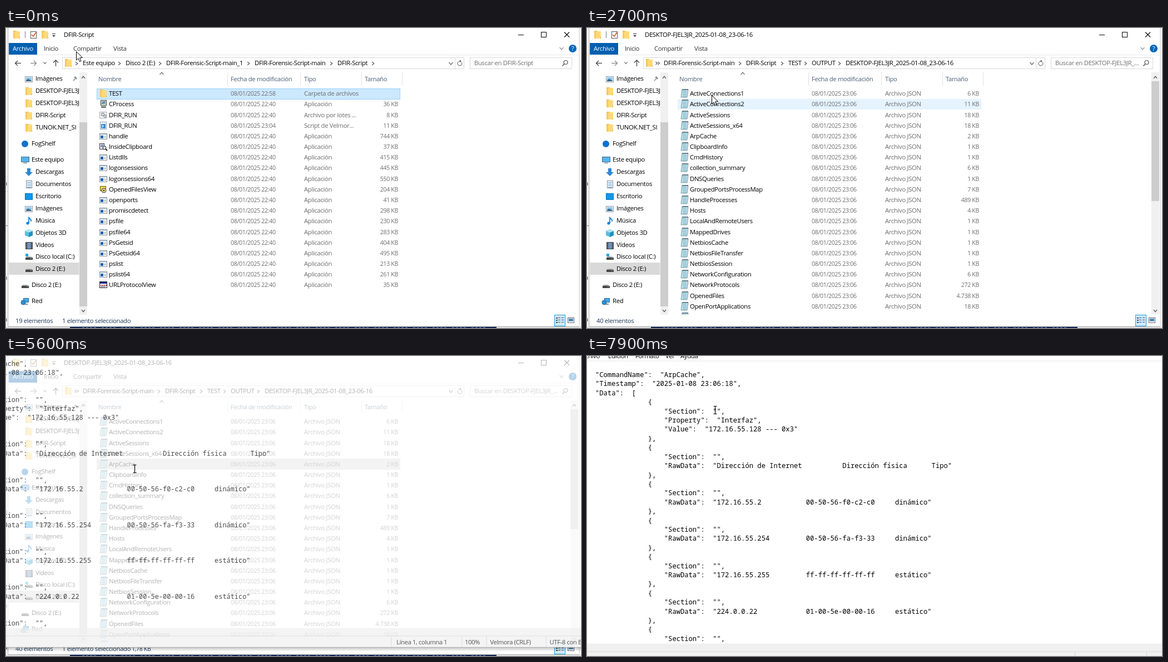
These frames come from a looping animation (1034x541 px, 8 s). An HTML page with a canvas:

```html
<!DOCTYPE html>
<html lang="es">
<head>
<meta charset="utf-8">
<title>Explorador y bloc de notas</title>
<style>
html, body { margin: 0; width: 100%; height: 100%; overflow: hidden; background: #fff; }
canvas { display: block; }
</style>
</head>
<body>
<canvas id="stage" width="1034" height="541"></canvas>
<script>
const ctx = document.getElementById('stage').getContext('2d');
const LOOP = 8000, STEP = 100;
const ROW0 = 108.6, ROW_H = 19.18;
const UI = '"Open Sans", "Noto Sans", sans-serif';
const MONO = '"Noto Sans Mono", "DejaVu Sans Mono", monospace';
const HOST = 'DESKTOP-FJEL3JR';
const REPORT = HOST + '_2025-01-08_23-06-16';
const GREY = '#6d6d6d';

// ---------- helpers ----------
function rect(x, y, w, h, fill, line) {
  if (fill) { ctx.fillStyle = fill; ctx.fillRect(x, y, w, h); }
  if (line) { ctx.strokeStyle = line; ctx.lineWidth = 1; ctx.strokeRect(x + .5, y + .5, w - 1, h - 1); }
}
function path(points, line, width = 1, fill) {
  ctx.beginPath();
  for (let i = 0; i < points.length; i += 2) ctx.lineTo(points[i], points[i + 1]);
  if (fill) { ctx.closePath(); ctx.fillStyle = fill; ctx.fill(); }
  if (line) { ctx.strokeStyle = line; ctx.lineWidth = width; ctx.stroke(); }
}
function disc(x, y, r, fill, line, width = 1) {
  ctx.beginPath();
  ctx.arc(x, y, r, 0, 7);
  if (fill) { ctx.fillStyle = fill; ctx.fill(); }
  if (line) { ctx.strokeStyle = line; ctx.lineWidth = width; ctx.stroke(); }
}
function text(s, x, midY, color = '#000', size = 11.3, align = 'left') {
  ctx.font = size + 'px ' + UI;
  ctx.letterSpacing = '-0.33px';
  ctx.textAlign = align;
  ctx.fillStyle = color;
  ctx.fillText(s, x, midY + 4);
}
function chevron(x, y, dir, color = '#555', r = 3) {
  const h = r * .6;
  const p = { right: [-h, -r, h, 0, -h, r], down: [-r, -h, 0, h, r, -h], up: [-r, h, 0, -h, r, h] }[dir];
  path(p.map((v, i) => v + (i % 2 ? y : x)), color, 1.2);
}
function clipped(x, y, w, h, draw) {
  ctx.save();
  ctx.beginPath();
  ctx.rect(x, y, w, h);
  ctx.clip();
  draw();
  ctx.restore();
}
// Linear interpolation over [time, ...values] keys.
function track(keys, t) {
  let i = keys.findIndex(k => k[0] > t);
  if (i < 0) return keys[keys.length - 1].slice(1);
  if (i === 0) return keys[0].slice(1);
  const a = keys[i - 1], b = keys[i], u = (t - a[0]) / (b[0] - a[0]);
  return a.slice(1).map((v, j) => v + (b[j + 1] - v) * u);
}

// ---------- icons, drawn around their centre ----------
const icons = {
  folder() {
    rect(-6, -7, 6, 3, '#e8b94a');
    rect(-6, -6, 12, 13, '#ffd978');
    rect(-6, -6, 3, 13, '#f7c95c');
    rect(5, 4, 1, 3, '#e0b050');
  },
  app() {
    rect(-7, -5, 14, 11, '#fff', '#8a8f96');
    rect(-6, -4, 12, 2, '#c4d3e2');
    rect(-5, -1, 5, 5, '#1c62b9');
    rect(1, 0, 4, 1, '#9aa');
    rect(1, 2, 4, 1, '#9aa');
  },
  json() {
    path([-4, -7, 7, -7, 5, 7, -6, 7], '#7d98a3', 1, '#bfe3ee');
    for (let y = -4; y < 6; y += 3) path([-3, y, 4, y], '#6fa6bb');
    path([-4, -7, 7, -7], '#4d6a74', 1.5);
  },
  batch() {
    rect(-7, -6, 13, 12, '#f4f6f8', '#a4abb2');
    disc(-1, -1, 2.5, null, '#8b969f', 1.5);
    disc(3, 2, 2, null, '#8b969f', 1.3);
  },
  script() {
    rect(-6, -7, 12, 14, '#eef5fb', '#8fa5b8');
    rect(-4, -3, 8, 8, '#3b8cc9');
    path([-2, -1, 0, 1, -2, 3], '#fff', 1.2);
  },
  cproc() {
    rect(-5, -7, 11, 10, '#d9e8d4', '#33423a');
    path([-3, -4, 4, -4, -3, -1, 4, -1], '#234c86');
    rect(-4, 4, 9, 3, '#777');
  },
  clip() {
    rect(-7, -6, 9, 11, '#f3f3f3', '#333');
    path([-5, -3, 0, -3, -5, 0, 0, 0], '#234c9c');
    disc(2, 2, 3, '#d8e8ff', '#222');
    path([4, 4, 7, 7], '#222', 2);
  },
  opened() {
    rect(-6, -6, 11, 9, '#f0d25a', '#665512');
    disc(1, 2, 4, '#f8e89a', '#333');
    disc(1, 2, 1.5, '#333');
  },
  url() {
    rect(-7, -6, 14, 12, '#fff', '#223');
    rect(-6, -5, 12, 3, '#17268c');
    for (let x = -5; x < 5; x += 3) rect(x, 0, 2, 2, '#b22a3a');
    rect(-5, 3, 9, 1, '#333');
  },
  picture() {
    rect(-7, -5, 14, 11, '#fff', '#8497a5');
    rect(-5, -3, 10, 7, '#8cc5ed');
    path([-5, 4, -5, 2, -1, 0, 5, 3, 5, 4], null, 1, '#355f7d');
  },
  cloud() { disc(0, 0, 6, '#0f72cf'); },
  pc() {
    rect(-7, -6, 15, 10, '#55b4ee', '#3b6f94');
    rect(-3, 5, 7, 1, '#4b6373');
  },
  down() { path([-3, -7, 3, -7, 3, 0, 7, 0, 0, 7, -7, 0, -3, 0], null, 1, '#2f86d1'); },
  doc() {
    rect(-5, -7, 11, 14, '#fff', '#7d8d99');
    for (let y = -4; y < 6; y += 3) path([-3, y + .5, 4, y + .5], '#4a8fc4');
  },
  desk() { rect(-7, -6, 14, 12, '#0f97ea', '#0870b8'); },
  music() {
    disc(-2, 4, 2.6, '#1780d4');
    path([0, 4, 0, -6, 4, -2, 4, 1], '#1780d4', 1.8);
  },
  cube() {
    path([0, -7, 7, -4, 7, 4, 0, 7, -7, 4, -7, -4], null, 1, '#58bfe2');
    path([0, -1, 7, -4, 7, 4, 0, 7], null, 1, '#2590bd');
    path([0, -7, 7, -4, 0, -1, -7, -4], null, 1, '#a7e4f4');
  },
  video() {
    rect(-6, -6, 13, 13, '#3a3a3a');
    rect(-3, -5, 7, 11, '#6f92b8');
    for (let y = -5; y < 6; y += 3) { rect(-5, y, 1, 1, '#fff'); rect(5, y, 1, 1, '#fff'); }
  },
  drive() {
    path([-4, -1, 4, -1, 7, 2, -6, 2], null, 1, '#aaa');
    rect(-6, 1, 13, 4, '#444');
    rect(3, 2, 2, 1, '#6fe08c');
  },
  system() {
    rect(-6, -6, 5, 5, '#27a3e8');
    icons.drive();
  },
  net() {
    rect(-3, -6, 10, 8, '#4aa7e2', '#2c6d9c');
    disc(-3, 2, 4, '#2f8fce', '#1f6a9c');
    path([-1, 5, 5, 5], '#567', 1.5);
  }
};
function icon(kind, x, y) {
  ctx.save();
  ctx.translate(Math.round(x), Math.round(y));
  icons[kind]();
  ctx.restore();
}

// ---------- folder contents ----------
const kinds = { folder: 'Carpeta de archivos', app: 'Aplicación', json: 'Archivo JSON',
  batch: 'Archivo por lotes ...', script: 'Script de Velmor...' };
// name,size,kind,time
function files(list, kind, time) {
  return list.split(' ').map(s => {
    const [name, size, k = kind, at = time] = s.split(',');
    return { name, size, kind: k, date: '08/01/2025 ' + at };
  });
}
const disk = [[138, 'Este equipo'], [215, 'Disco 2 (E:)'], [288, 'DFIR-Forensic-Script-main_1'],
  [447, 'DFIR-Forensic-Script-main'], [596, 'DFIR-Script']];
const test = [671, 'TEST'];
const folders = {
  script: {
    title: 'DFIR-Script', crumbs: disk, tail: 660, count: '19 elementos',
    rows: files('TEST,,folder,22:58 CProcess,36,cproc DFIR_RUN,8,batch DFIR_RUN,11,script,23:04 handle,744 ' +
      'InsideClipboard,37,clip Listdlls,415 logonsessions,445 logonsessions64,550 OpenedFilesView,204,opened ' +
      'openports,41 promiscdetect,298 psfile,230 psfile64,283 PsGetsid,404 PsGetsid64,495 pslist,213 ' +
      'pslist64,261 URLProtocolView,35,url', 'app', '22:40')
  },
  test: {
    title: 'TEST', crumbs: [...disk, test], tail: 703, count: '1 elemento',
    rows: files('OUTPUT,', 'folder', '23:06')
  },
  output: {
    title: 'OUTPUT', crumbs: [...disk, test, [714, 'OUTPUT']], count: '2 elementos',
    rows: files(`${HOST}_2025-01-08_23-04-53,,folder,23:13 ${REPORT},`, 'folder', '23:06')
  },
  report: {
    title: REPORT, search: HOST + '_...', count: '40 elementos', scroll: true,
    crumbs: [[138, 'DFIR-Forensic-Script-main'], [286, 'DFIR-Script'], [362, 'TEST'], [404, 'OUTPUT'], [465, REPORT]],
    rows: files('ActiveConnections1,6 ActiveConnections2,11 ActiveSessions,18 ActiveSessions_x64,18 ArpCache,2 ' +
      'ClipboardInfo,1 CmdHistory,1 collection_summary,6 DNSQueries,1 GroupedPortsProcessMap,7 ' +
      'HandleProcesses,489 Hosts,4 LocalAndRemoteUsers,1 MappedDrives,1 NetbiosCache,1 NetbiosFileTransfer,1 ' +
      'NetbiosSession,1 NetworkConfiguration,6 NetworkProtocols,272 OpenedFiles,4.738 ' +
      'OpenPortApplications,18 PowerShellHistory,13', 'json', '23:06')
  }
};
const places = [
  [91, 'picture', 'Imágenes'], [113, 'folder', HOST], [135, 'folder', HOST], [157, 'folder', 'DFIR-Script'],
  [179, 'folder', 'TUNOK.NET_SI'], [208, 'cloud', 'FogShelf', 1], [237, 'pc', 'Este equipo', 1],
  [259, 'down', 'Descargas'], [281, 'doc', 'Documentos'], [303, 'desk', 'Escritorio'],
  [325, 'picture', 'Imágenes'], [347, 'music', 'Música'], [369, 'cube', 'Objetos 3D'],
  [391, 'video', 'Vídeos'], [412, 'system', 'Disco local (C:)'], [434, 'drive', 'Disco 2 (E:)'],
  [463, 'drive', 'Disco 2 (E:)', 1], [492, 'net', 'Red', 1]
];

// ---------- motion ----------
const pointer = [
  [0, 126, 42], [100, 135, 60], [200, 163, 108], [300, 190, 148], [400, 200, 157], [500, 203, 140],
  [600, 205, 122], [1400, 205, 122], [1600, 217, 122], [1700, 221, 122], [1900, 224, 138], [2500, 224, 138],
  [2600, 224, 130], [2700, 224, 121], [2800, 228, 170], [3000, 262, 380], [3100, 280, 470],
  [3300, 308, 330], [3400, 313, 306], [3500, 300, 314], [3600, 280, 322], [3700, 262, 321],
  [4300, 238, 238], [4600, 230, 201], [4700, 230, 201], [4800, 231, 202], [5600, 231, 203],
  [5800, 222, 120], [6000, 210, 20], [6100, 205, -35], [7800, 215, -35], [7900, 230, 97]
];
const drag = [
  [7100, -22, -9], [7200, 0, 0], [7300, 38, 4], [7400, 72, 8], [7500, 95, 11], [7600, 95, 11],
  [7700, 118, 12], [7800, 142, 14], [7900, 158, 14.5]
];
const opening = [[5500, .95, .3], [5600, .983, .7], [5700, .997, .95], [5800, 1, 1]];
const tipFade = [[3400, 0], [3500, 1], [3600, 1], [3700, .9], [3800, .4], [3900, 0]];

// ---------- explorer ----------
function scrollbar(x, top, bottom) {
  rect(x, 80, 14, 437, '#f0f0f0');
  rect(x, top, 14, bottom - top, '#cdcdcd');
  chevron(x + 7, 89, 'up', '#444');
  chevron(x + 7, 510, 'down', '#444');
}
function backdrop() {
  rect(0, 0, 1034, 541, '#fff');
  [280, 450, 525].forEach(y => text('a', -4, y, '#333'));
  path([0, 356.5, 3, 356.5], '#777');
  path([3.5, 0, 3.5, 538], '#a6a6a6');
  path([1031, 0, 1031, 538], '#c4c4c4');
  path([3, 538.5, 1031, 538.5], '#a6a6a6');
  rect(0, 539, 1034, 2, '#e4e4e4');
  rect(115, 539, 767, 2, '#0b2452');
  for (let x = 130; x < 872; x += 7) if (x * 13 % 5) rect(x, 540, 4, 1, '#7e93b4');
}
function titleBar(title) {
  icon('folder', 19, 12);
  path([34.5, 6, 34.5, 18], '#777');
  rect(44, 6, 11, 13, '#fff', '#555');
  path([46, 12, 49, 15, 54, 8], '#d0562c', 1.6);
  icon('folder', 70, 12);
  path([83, 10.5, 89, 10.5], '#333');
  path([83, 13, 89, 13, 86, 16], null, 1, '#333');
  text(title, 104, 12);
  path([921, 12.5, 931, 12.5], '#000');
  rect(962, 7, 10, 10, null, '#000');
  path([1004, 7.5, 1013, 16.5], '#000', 1.1);
  path([1013, 7.5, 1004, 16.5], '#000', 1.1);
}
function ribbon() {
  rect(5, 27, 51, 21, '#005fb0');
  text('Archivo', 12, 37, '#fff');
  text('Inicio', 68, 37, '#333');
  text('Compartir', 121, 37, '#333');
  text('Vista', 193, 37, '#333');
  path([56, 48.5, 1031, 48.5], '#e8e8e8');
  chevron(999, 37, 'down', '#8a8a8a', 3.5);
  disc(1019, 37, 7, '#0067b8');
  text('?', 1019, 37, '#fff', 11, 'center');
}
function addressBar(f, t) {
  path([27, 63.5, 17, 63.5], '#444', 1.3);
  path([21, 59, 16.5, 63.5, 21, 68], '#444', 1.3);
  path([44, 63.5, 54, 63.5], '#888', 1.3);
  path([50, 59, 54.5, 63.5, 50, 68], '#888', 1.3);
  chevron(70, 63, 'down', '#777', 2.5);
  path([89.5, 69, 89.5, 58], '#444', 1.3);
  path([85, 62.5, 89.5, 58, 94, 62.5], '#444', 1.3);
  rect(101, 53, 723, 21, '#fff', '#d9d9d9');
  icon('folder', 112, 63);
  f.crumbs.forEach(([x, label], i) => {
    if (f.scroll && !i) { chevron(125, 63.5, 'right', '#555', 2.5); chevron(129, 63.5, 'right', '#555', 2.5); }
    else chevron(x - 11, 64, 'right');
    text(label, x, 63);
  });
  if (f.tail && !(f === folders.test && t < 1200)) chevron(f.tail, 64, 'right');
  chevron(800, 64, 'down', '#555', 3.5);
  path([807.5, 54, 807.5, 73], '#d9d9d9');
  ctx.beginPath();
  ctx.arc(816, 64, 4, -.6, 4.7);
  ctx.strokeStyle = '#555';
  ctx.stroke();
  path([816, 57.5, 819, 60, 816, 62], null, 1, '#555');
  rect(834, 53, 184, 21, '#fff', '#d9d9d9');
  text('Buscar en ' + (f.search || f.title), 842, 63, GREY);
  disc(1006.5, 62, 3.5, null, '#555', 1.2);
  path([1004, 64.5, 1000.5, 68.5], '#555', 1.5);
}
function sidebar() {
  clipped(4, 80, 127.5, 437, () => {
    rect(5, 423, 127, 22, '#d9d9d9');
    for (const [y, kind, label, top] of places) {
      icon(kind, top ? 34 : 41, y + 1);
      text(label, top ? 46 : 53, y);
    }
  });
  path([121, 95, 124, 92], '#777', 1.2);
  path([122, 89, 126, 93, 128, 91, 125, 87], null, 1, '#8a9299');
  scrollbar(132, 170, 502);
}
function list(f, selected, hover, focused) {
  const heads = { 166: 'Nombre', 404: 'Fecha de modificación', 536: 'Tipo', 645: 'Tamaño' };
  for (const x in heads) text(heads[x], +x, 92, '#4c607a');
  [398, 529, 639, 712].forEach(x => path([x + .5, 80, x + .5, 104], '#e2e2e2'));
  chevron(280, 82, 'up', '#666', 3.5);
  clipped(150, 105, 865, 412, () => f.rows.forEach((r, i) => {
    const top = ROW0 + i * ROW_H, y = Math.round(top + ROW_H / 2);
    if (i === selected) rect(163, Math.round(top), 546, 20, focused ? '#cce8ff' : '#d9d9d9', focused && '#99d1ff');
    else if (i === hover) rect(163, Math.round(top), 546, 19, '#e5f3ff');
    icon(r.kind, 174.5, y);
    text(r.name, 185, y);
    text(r.date, 404, y, GREY, 10.6);
    text(kinds[r.kind] || kinds.app, 536, y, GREY);
    if (r.size) text(r.size + ' KB', 705, y, GREY, 10.6, 'right');
  }));
  if (f.scroll) scrollbar(1015, 96, 312);
}
function statusBar(f, selected) {
  const navy = '#1e395b';
  text(f.count, 17, 528, navy);
  if (selected >= 0) text('1 elemento seleccionado', 101, 528, navy);
  if (selected >= 0 && f.scroll) text('1,78 KB', 226, 528, navy, 10.6);
  rect(986, 517, 20, 21, '#cce8ff', '#26a0da');
  for (let y = 522; y < 534; y += 4) {
    rect(989, y, 3, 2, '#456');
    rect(993, y, 4, 1, '#456');
    rect(999, y, 4, 1, '#456');
  }
  rect(1010, 522, 12, 10, '#fff', '#667');
  rect(1012, 524, 8, 5, '#4b8ab8');
}
function tooltip(alpha) {
  if (alpha <= 0) return;
  ctx.save();
  ctx.globalAlpha = alpha;
  rect(520, 329, 3, 45, 'rgba(0,0,0,.3)');
  rect(316, 371, 204, 3, 'rgba(0,0,0,.3)');
  rect(313, 326, 207, 45, '#fff', '#767676');
  ['Tipo: Archivo JSON', 'Tamaño: 488 KB', 'Fecha de modificación: 08/01/2025 23:06']
    .forEach((s, i) => text(s, 319, 335 + i * 13.7, '#6a6a6a', 11));
  ctx.restore();
}
function explorer(t) {
  const name = t < 1000 ? 'script' : t < 1500 ? 'test' : t < 2300 ? 'output' : 'report';
  const f = folders[name];
  const selected = name === 'script' ? 0 : name === 'output' && t >= 2100 ? 1 : t >= 5300 ? 4 : -1;
  // Row highlight trails the pointer by one step.
  const [px, py] = track(pointer, Math.max(0, t - STEP));
  const hover = px >= 163 && t < 5500 ? Math.floor((py - ROW0) / ROW_H) : -1;
  backdrop();
  titleBar(f.title);
  ribbon();
  addressBar(f, t);
  sidebar();
  list(f, selected, hover, t < 5500);
  statusBar(f, selected);
  tooltip(track(tipFade, t)[0]);
}

// ---------- notepad ----------
const arp = [['172.16.55.2', '00-50-56-f0-c2-c0', 'dinámico'], ['172.16.55.254', '00-50-56-fa-f3-33', 'dinámico'],
  ['172.16.55.255', 'ff-ff-ff-ff-ff-ff', 'estático'], ['224.0.0.22', '01-00-5e-00-00-16', 'estático']];
const pad = ' '.repeat(17), brace = ' '.repeat(13);
const section = pad + '"Section":  "",';
const raw = s => [brace + '{', section, pad + '"RawData":  "' + s + '"', brace + '},'];
const lines = [
  '"CommandName":  "ArpCache",', '"Timestamp":  "2025-01-08 23:06:18",', '"Data":  [',
  brace + '{', section, pad + '"Property":  "Interfaz",', pad + '"Value":  "172.16.55.128 --- 0x3"', brace + '},',
  ...raw('Dirección de Internet' + ' '.repeat(10) + 'Dirección física' + ' '.repeat(6) + 'Tipo'),
  ...arp.flatMap(([ip, mac, type]) => raw(ip.padEnd(22) + mac + '     ' + type)),
  brace + '{', section
];
const win = { left: -178, top: -58, right: 1090, bottom: 540 };

function notepad(t) {
  if (t < 5500) return;
  const [scale, alpha] = track(opening, t), [dx, dy] = track(drag, t);
  const cx = (win.left + win.right) / 2, cy = (win.top + win.bottom) / 2;
  const w = win.right - win.left;
  ctx.save();
  ctx.globalAlpha = alpha;
  ctx.translate(cx + dx, cy + dy);
  ctx.scale(scale, scale);
  ctx.translate(-cx, -cy);
  // The shadow stays outside, so the fading sheet remains white.
  const shade = ctx.createLinearGradient(0, win.bottom, 0, win.bottom + 7);
  shade.addColorStop(0, 'rgba(0,0,0,.3)');
  shade.addColorStop(1, 'rgba(0,0,0,0)');
  rect(win.left, win.bottom, w, 7, shade);
  rect(win.left, win.top, w, win.bottom - win.top, '#fff');

  const menu = { '-172': 'Archivo', '-120': 'Edición', '-71': 'Formato', '-17': 'Ver', 10: 'Ayuda' };
  for (const x in menu) text(menu[x], +x, -15);
  path([win.left, -5.5, win.right, -5.5], '#e6e6e6');

  ctx.font = '12.15px ' + MONO;
  ctx.letterSpacing = '0px';
  ctx.textAlign = 'left';
  ctx.fillStyle = '#000';
  lines.forEach((s, i) => ctx.fillText(s, -143, 23.5 + i * 16.41));

  rect(win.left, 504, w, 36, '#f0f0f0');
  path([win.left, 518.5, win.right, 518.5], '#d7d7d7');
  [719, 848, 893, 1002].forEach(x => path([x + .5, 519, x + .5, 539], '#d2d2d2'));
  const info = { 729: 'Línea 1, columna 1', 854: '100%', 900: 'Velmora (CRLF)', 1009: 'UTF-8 con BOM' };
  for (const x in info) text(info[x], +x, 530, '#111');
  path([win.left, 539.5, win.right, 539.5], '#8a8a8a');
  ctx.restore();
}

// ---------- pointer ----------
function cursor(t) {
  const [x, y] = track(pointer, t);
  ctx.save();
  ctx.translate(Math.round(x), Math.round(y));
  if (t < 5500) {
    path([.5, .5, .5, 16, 4, 12.8, 6.4, 18.5, 9, 17.4, 6.6, 11.8, 11.5, 11.5, .5, .5], '#000', 1, '#fff');
  } else {
    path([.5, -6, .5, 7], '#000', 1.2);
    path([-2.5, -6.5, 3.5, -6.5], '#000');
    path([-2.5, 7.5, 3.5, 7.5], '#000');
  }
  ctx.restore();
}

const start = performance.now();
function frame() {
  const ms = (performance.now() - start) % LOOP;
  const t = Math.floor(ms / STEP) * STEP;
  explorer(t);
  notepad(t);
  cursor(t);
  requestAnimationFrame(frame);
}
frame();
</script>
</body>
</html>
```
